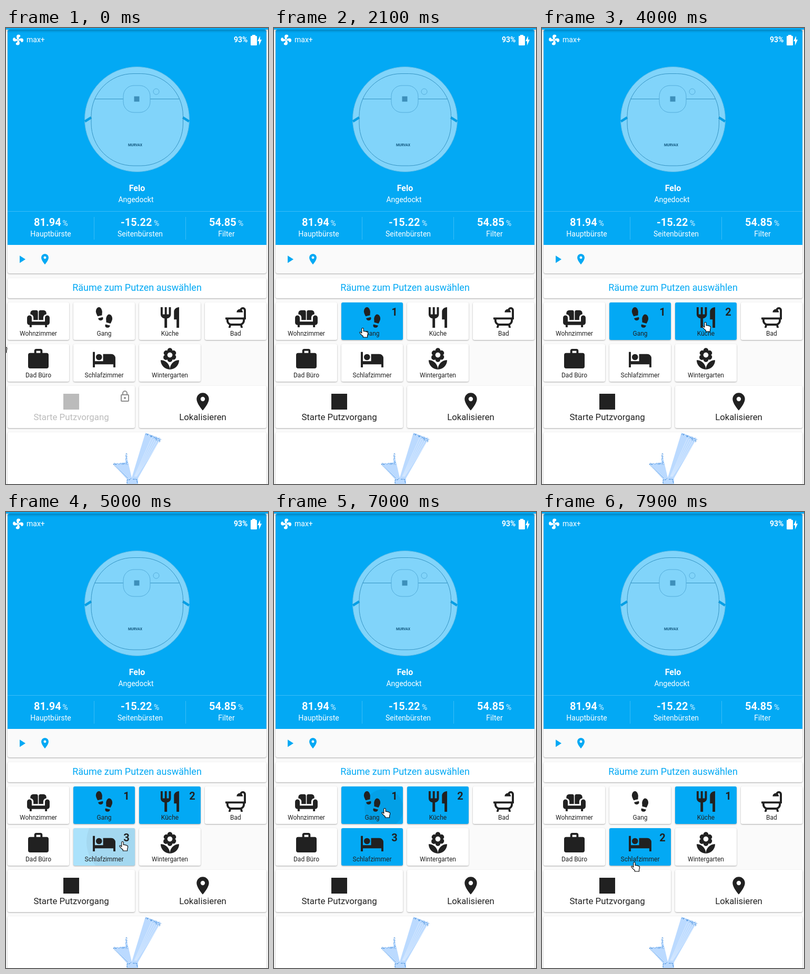
These frames come from a looping animation (498 by 864 pixels, 8000 ms). An HTML page:

```html
<!DOCTYPE html>
<html lang="de">
<head>
<meta charset="utf-8">
<title>Saugroboter</title>
<style>
  html, body { margin: 0; width: 100%; height: 100%; overflow: hidden; background: #fafafa; }
  svg { display: block; }
  text { font-family: Roboto, sans-serif; }
  .card { filter: drop-shadow(0 1px 1.2px rgba(0, 0, 0, .32)); }
  .mid { text-anchor: middle; }
  .bold { font-weight: 700; }
</style>
</head>
<body>
<svg id="stage" width="498" height="864" viewBox="0 0 498 864"></svg>
<script>
const BLUE = '#03a9f4', INK = '#212121';
const LOOP = 8000, STEP = 100;

const icons = {
  sofa: 'M7 5H10A1.7 1.7 0 0 1 11.6 6.7V14.5H7.2V12A3 3 0 0 0 4.2 9V7.8A2.8 2.8 0 0 1 7 5ZM17 5H14A1.7 1.7 0 0 0 12.4 6.7V14.5H16.8V12A3 3 0 0 1 19.8 9V7.8A2.8 2.8 0 0 0 17 5ZM3.3 10A2.3 2.3 0 0 1 5.6 12.3V16H18.4V12.3A2.3 2.3 0 0 1 23 12.3V17A2.5 2.5 0 0 1 20.5 19.3V21.5H18.5V19.3H5.5V21.5H3.5V19.3A2.5 2.5 0 0 1 1 17V12.3A2.3 2.3 0 0 1 3.3 10Z',
  steps: 'M10.74 11.72C11.21 12.95 11.16 14.23 9.75 14.74C6.85 15.81 6.2 13 6.16 12.86ZM5.71 10.91L10.03 9.84C9.84 8.79 10.13 7.74 10.13 6.5C10.13 4.82 8.8 1.53 6.68 2.06C4.26 2.66 3.91 5.35 4 6.65C4.12 7.95 5.64 10.73 5.71 10.91M17.85 19.85C17.82 20 17.16 22.8 14.26 21.74C12.86 21.22 12.8 19.94 13.27 18.71ZM20 13.65C20.1 12.35 19.76 9.65 17.33 9.05C15.22 8.5 13.89 11.81 13.89 13.5C13.89 14.73 14.17 15.78 14 16.83L18.3 17.9C18.38 17.72 19.89 14.94 20 13.65Z',
  cutlery: 'M11 9H9V2H7V9H5V2H3V9C3 11.12 4.66 12.84 6.75 12.97V22H9.25V12.97C11.34 12.84 13 11.12 13 9V2H11ZM16 6V14H18.5V22H21V2C18.24 2 16 4.24 16 6Z',
  bath: 'M21 14V15C21 16.91 19.93 18.57 18.35 19.41L19 22H17L16.5 20H7.5L7 22H5L5.65 19.41C4.07 18.57 3 16.91 3 15V14H2V12H20V5C20 4.45 19.55 4 19 4C18.5 4 18.12 4.34 18 4.79C18.63 5.33 19 6.13 19 7H13C13 5.34 14.34 4 16 4H16.17C16.58 2.83 17.69 2 19 2C20.66 2 22 3.34 22 5V14ZM19 14H5V15C5 16.66 6.34 18 8 18H16C17.66 18 19 16.66 19 15Z',
  briefcase: 'M10 2H14A2 2 0 0 1 16 4V6H20A2 2 0 0 1 22 8V19A2 2 0 0 1 20 21H4A2 2 0 0 1 2 19V8A2 2 0 0 1 4 6H8V4A2 2 0 0 1 10 2M14 6V4H10V6Z',
  bed: 'M19 7H11V14H3V5H1V20H3V17H21V20H23V11A4 4 0 0 0 19 7M7 13A3 3 0 0 0 7 7A3 3 0 0 0 7 13Z',
  flower: 'M3 13A9 9 0 0 0 12 22C12 17 7.97 13 3 13M12 5.5A2.5 2.5 0 0 1 12 10.5A2.5 2.5 0 0 1 12 5.5M5.6 10.25A2.5 2.5 0 0 0 9.5 12.31A2.5 2.5 0 1 0 14.5 12.31A2.5 2.5 0 0 0 16.97 8A2.5 2.5 0 0 0 14.5 3.69A2.5 2.5 0 1 0 9.5 3.69A2.5 2.5 0 0 0 7.03 8A2.5 2.5 0 0 0 5.6 10.25M12 22A9 9 0 0 0 21 13C16 13 12 17 12 22Z',
  pin: 'M12 11.5A2.5 2.5 0 0 1 12 6.5A2.5 2.5 0 0 1 12 11.5M12 2A7 7 0 0 0 5 9C5 14.25 12 22 12 22C12 22 19 14.25 19 9A7 7 0 0 0 12 2Z',
  play: 'M8 5.14V19.14L19 12.14Z',
  lock: 'M12 17A2 2 0 0 1 12 13A2 2 0 0 1 12 17M18 20V10H6V20ZM18 8A2 2 0 0 1 20 10V20A2 2 0 0 1 18 22H6A2 2 0 0 1 4 20V10A2 2 0 0 1 6 8H7V6A5 5 0 0 1 17 6V8ZM12 3A3 3 0 0 0 9 6V8H15V6A3 3 0 0 0 12 3Z',
  fan: 'M12 11A1 1 0 0 0 12 13A1 1 0 0 0 12 11M12.5 2C17 2 17.11 5.57 14.75 6.75C13.76 7.24 13.32 8.29 13.13 9.22C13.61 9.42 14.03 9.73 14.35 10.13C18.05 8.13 22.03 8.92 22.03 12.5C22.03 17 18.46 17.1 17.28 14.73C16.78 13.74 15.72 13.3 14.79 13.11C14.59 13.59 14.28 14 13.88 14.34C15.87 18.03 15.08 22 11.5 22C7 22 6.91 18.42 9.27 17.24C10.25 16.75 10.69 15.71 10.89 14.79C10.4 14.59 9.97 14.27 9.65 13.87C5.96 15.85 2 15.07 2 11.5C2 7 5.56 6.89 6.74 9.26C7.24 10.25 8.29 10.68 9.22 10.87C9.41 10.39 9.73 9.97 10.14 9.65C8.15 5.96 8.94 2 12.5 2Z',
  battery: 'M23 11H20V4L15 14H18V22ZM12.67 4H11V2H5V4H3.33A1.33 1.33 0 0 0 2 5.33V20.67A1.33 1.33 0 0 0 3.33 22H12.67A1.33 1.33 0 0 0 14 20.67V5.33A1.33 1.33 0 0 0 12.67 4Z'
};

const rooms = [
  { name: 'Wohnzimmer', icon: 'sofa' },
  { name: 'Gang', icon: 'steps', on: 1700, off: 7100, clicks: [1700, 7000] },
  { name: 'Küche', icon: 'cutlery', on: 3600, clicks: [3600] },
  { name: 'Bad', icon: 'bath' },
  { name: 'Dad Büro', icon: 'briefcase' },
  { name: 'Schlafzimmer', icon: 'bed', on: 4900, clicks: [4900] },
  { name: 'Wintergarten', icon: 'flower' }
];
rooms.forEach((room, i) => Object.assign(room, { x: 3 + i % 4 * 125, y: i < 4 ? 520 : 599 }));

// Pointer stops: time, x, y
const pointerPath = [
  [0, -15, 597], [200, 5, 643], [400, 5, 643], [900, 90, 600], [1200, 165, 570], [1300, 162, 568],
  [2200, 162, 568], [2400, 190, 570], [2600, 221, 567], [3100, 221, 567], [3200, 305, 558],
  [3500, 305, 558], [4000, 304, 557], [4400, 219, 622], [4500, 215, 624], [5300, 215, 624],
  [5600, 190, 623], [5700, 189, 598], [6000, 204, 561], [7600, 204, 561], [7900, 169, 663]
];

const clamp = v => Math.max(0, Math.min(1, v));
const lerp = (a, b, p) => a + (b - a) * p;

const icon = (name, x, y, scale = 1, fill = INK) =>
  `<path d="${icons[name]}" transform="translate(${x} ${y}) scale(${scale})" fill="${fill}" fill-rule="evenodd"/>`;
const text = (str, x, y, size, fill, cls = '') =>
  `<text x="${x}" y="${y}" font-size="${size}" fill="${fill}" class="${cls}">${str}</text>`;
const card = (x, y, w, h, fill = '#fff') =>
  `<rect class="card" x="${x}" y="${y}" width="${w}" height="${h}" rx="3" fill="${fill}"/>`;

const stat = (value, x, unitX, label, center) =>
  text(value, x, 375, 20, '#fff', 'bold') + text('%', unitX, 375, 14, '#e1f4fe') +
  text(label, center, 395, 14, '#fff', 'mid');

const robot = `
  <circle cx="249" cy="173" r="99.5" fill="#81d4fa" stroke="#56b9e6"/>
  <path d="M150 177L162 169.500M348 177L336 169.500" stroke="#069fe5" stroke-width="4.500"/>
  <g fill="none" stroke="#3594c4">
    <rect x="162" y="86.500" width="174.500" height="174.500" rx="80"/>
    <path d="M168 134.500H223M274 134.500H330"/>
    <g stroke="#55addb"><rect x="223" y="109" width="51" height="51" rx="20"/><circle cx="285.500" cy="120.500" r="5.500"/></g>
  </g>
  <rect x="243.500" y="129.500" width="10" height="10" fill="#3d8fba"/>
  ${text('MURVAX', 245.5, 224, 6.6, '#12587f', 'mid bold')}`;

const header = `
  <rect class="card" x="3" y="3" width="492" height="462" rx="4" fill="#fafafa"/>
  <path d="M3 411V7a4 4 0 0 1 4-4H491a4 4 0 0 1 4 4V411Z" fill="${BLUE}"/>
  <rect width="498" height="3" fill="${BLUE}" style="filter:drop-shadow(0 2px 2px rgba(0,0,0,.35))"/>
  ${icon('fan', 11, 10.5, 1, '#fff')}${text('max+', 39, 27, 14, '#fff')}
  ${text('93%', 433, 27, 14, '#fff', 'bold')}${icon('battery', 463, 11, 1, '#fff')}
  ${robot}
  ${text('Felo', 249, 309, 16, '#fff', 'mid bold')}${text('Angedockt', 247, 330, 14, '#fff', 'mid')}
  <path d="M3 347.500H495M167.500 358V401M341.500 358V401" stroke="#fff" stroke-opacity=".22"/>
  ${stat('81.94', 53, 107.5, 'Hauptbürste', 85)}
  ${stat('-15.22', 218, 281, 'Seitenbürsten', 255)}
  ${stat('54.85', 386, 441, 'Filter', 419)}
  ${icon('play', 18, 426, 1, BLUE)}${icon('pin', 62, 426, 1, BLUE)}`;

const tile = (room, i) => `
  <rect id="tile${i}" class="card" x="${room.x}" y="${room.y}" width="117" height="71" rx="3" fill="#fff"/>
  <svg x="${room.x}" y="${room.y}" width="117" height="71"><circle id="ripple${i}" r="0"/></svg>
  ${icon(room.icon, room.x + 35.1, room.y + 5, 1.95)}
  ${text(room.name, room.x + 58.5, room.y + 63, 12, INK, 'mid')}
  <text id="count${i}" x="${room.x + 101}" y="${room.y + 25}" font-size="20" fill="${INK}" class="mid bold"></text>`;

const buttons = `
  ${card(3, 678, 242, 80)}${card(253, 678, 242, 80)}
  <g id="start"><rect x="109" y="693" width="30" height="30" fill="${INK}"/>
  ${text('Starte Putzvorgang', 124, 743, 16.8, INK, 'mid')}</g>
  <g id="lock">${icon('lock', 214, 686, 1, '#8f8f8f')}</g>
  ${icon('pin', 354, 688, 1.667)}${text('Lokalisieren', 374, 743, 16.8, INK, 'mid')}`;

function floorMap() {
  let seed = 7, dots = '', rays = '';
  const random = () => (seed = seed * 16807 % 2147483647) / 2147483647;
  const dot = (x, y) => dots += `M${x.toFixed(1)} ${y.toFixed(1)}h1v1h-1z`;
  for (let i = 0; i < 45; i++) {
    const p = random();
    dot(265 + 29 * p, 767 + 10 * p + random() * (3 + 6 * p));
  }
  for (let i = 0; i < 30; i++) dot(204 + 27 * random(), 824 + random() * 2.5);
  for (let i = 0; i < 16; i++) dot(226 + random() * 4, 803 + 20 * random());
  for (let i = 0; i < 14; i++) dot(204 + i * 2, 827 + i * 1.9);
  for (let i = 0; i < 5; i++) rays += `M${277 + i * 4} ${776 + i}L${244 + i} 850`;
  return `${card(3, 766, 492, 110)}
    <path d="M265 767L294 778L251 853V864H230V855L204 826L227 823L228 806L232 822L239 852Z" fill="#bbdaff"/>
    <path d="${rays}" stroke="#e6f1ff" stroke-width=".7"/>
    <path d="${dots}" fill="#3b87d8"/>
    <path d="M230 863V856H235L238 853M241 855H248L250 863" fill="none" stroke="#3b87d8" stroke-dasharray="4 1"/>`;
}

document.getElementById('stage').innerHTML = `
  <rect width="498" height="864" fill="#fafafa"/>
  ${header}
  ${card(3, 474, 492, 38)}${text('Räume zum Putzen auswählen', 249, 498, 18, BLUE, 'mid')}
  ${rooms.map(tile).join('')}
  ${buttons}
  ${floorMap()}
  <path id="pointer" fill="#fff" stroke="#000" stroke-width="1.100" stroke-linejoin="round"
    d="M4.800 2.200a1.700 1.700 0 0 1 3.400 0V6.800l1.400-.5 1.500.7 1.500-.2 1.400 1 1.500.3c1.100.6 1.300 1.600 1.100 3l-1 3.600V18H7.300V16L3.200 12.300.9 9.500c-.5-1.200.9-2 1.900-1.200L4.800 10.200Z"/>`;

const el = id => document.getElementById(id);

function pointerAt(t) {
  const next = pointerPath.findIndex(stop => stop[0] > t);
  if (next < 0) return pointerPath.at(-1).slice(1);
  const [t0, x0, y0] = pointerPath[next - 1], [t1, x1, y1] = pointerPath[next];
  const p = (t - t0) / (t1 - t0);
  return [Math.round(lerp(x0, x1, p)), Math.round(lerp(y0, y1, p))];
}

function drawRoom(room, i, t, count) {
  const { on, off = Infinity } = room;
  const blue = clamp((t - on) / 300) - clamp((t - off) / 300);
  el('tile' + i).setAttribute('fill', `rgb(${lerp(255, 3, blue)},${lerp(255, 169, blue)},${lerp(255, 244, blue)})`);
  el('count' + i).textContent = count || '';

  const ripple = el('ripple' + i);
  const click = room.clicks.find(c => t >= c && t < c + 400);
  ripple.setAttribute('r', click === undefined ? 0 : 37 + (t - click) * .3);
  if (click === undefined) return;
  const [x, y] = pointerAt(click);
  ripple.setAttribute('cx', x + 5 - room.x);
  ripple.setAttribute('cy', y + 1 - room.y);
  ripple.setAttribute('fill-opacity', .055 * (1 - (t - click) / 400));
}

function draw() {
  const t = Math.floor(performance.now() % LOOP / STEP) * STEP;
  let count = 0;
  rooms.forEach((room, i) => {
    if (!room.clicks) return;
    const selected = t >= room.on && !(t >= room.off);
    drawRoom(room, i, t, selected && ++count);
  });
  el('start').setAttribute('opacity', .3 + .7 * clamp((t - 1680) / 300));
  el('lock').setAttribute('visibility', t < 1700 ? 'visible' : 'hidden');
  el('pointer').setAttribute('transform', `translate(${pointerAt(t)})`);
  requestAnimationFrame(draw);
}
draw();
</script>
</body>
</html>
```
